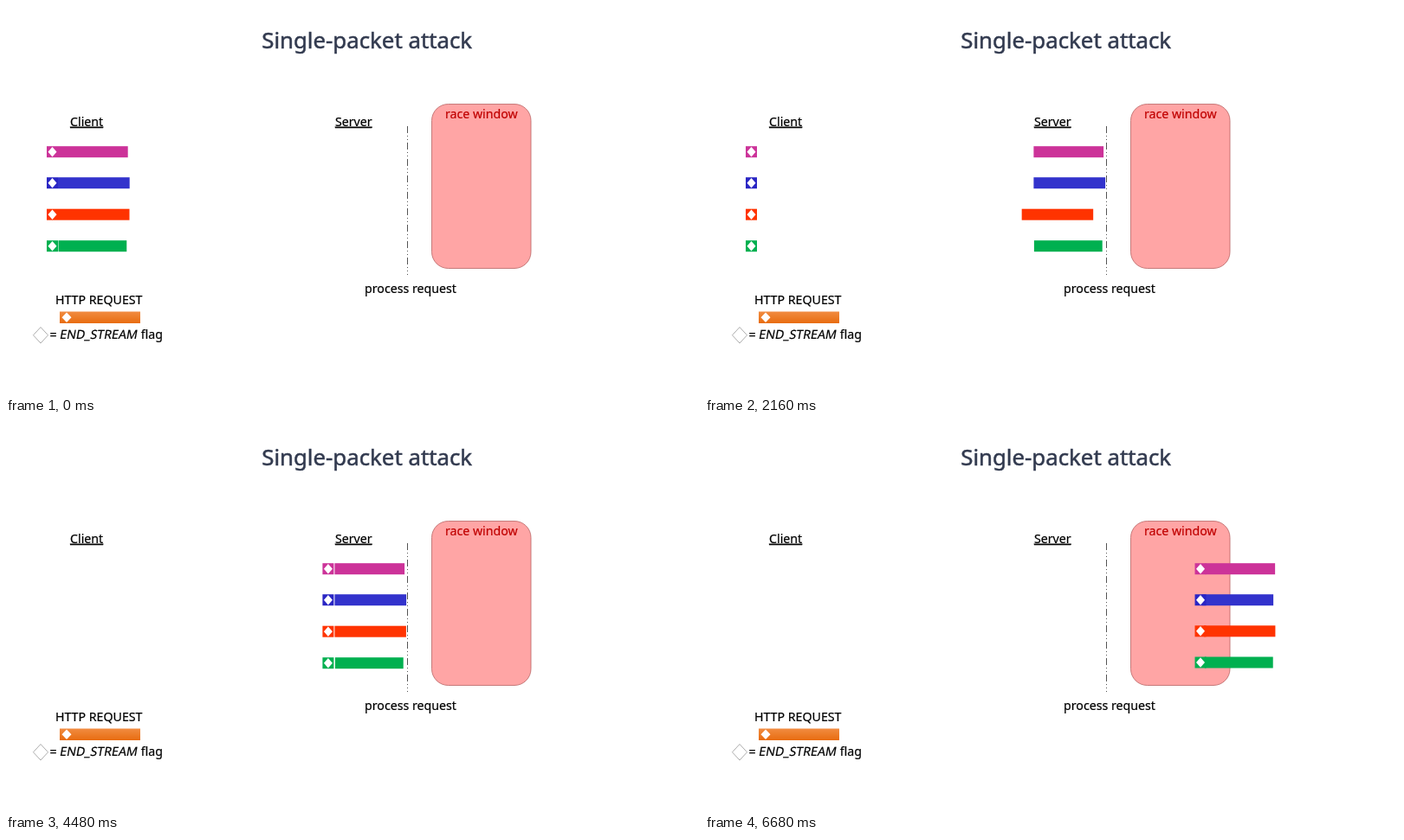
Write an HTML page that moves like this. It is 800 px wide and 450 px high and loops after 6.72 s.

```html
<!DOCTYPE html>
<html lang="en">
<head>
<meta charset="utf-8">
<title>Single-packet attack</title>
<style>
  html, body { margin: 0; width: 100%; height: 100%; overflow: hidden; background: #fff; }
  svg { display: block; width: 800px; height: 450px; }
  text { font: 14.2px "Noto Sans", "Open Sans", sans-serif; fill: #000; stroke: #000; stroke-width: .2px; }
  .mid { text-anchor: middle; }
  .title { font-size: 25.8px; fill: #323a4f; stroke: #323a4f; stroke-width: .5px; }
  .head { text-decoration: underline; text-decoration-thickness: 1px; }
  .race { fill: #c00000; stroke: #c00000; }
</style>
</head>
<body>
<svg viewBox="0 0 800 450">
  <defs>
    <linearGradient id="orange" x2="0" y2="1">
      <stop offset="0" stop-color="#f18c41"/>
      <stop offset="1" stop-color="#e86c10"/>
    </linearGradient>
  </defs>
  <text class="mid title" x="416.7" y="49">Single-packet attack</text>
  <text class="mid head" x="93.1" y="138.7">Client</text>
  <text class="mid head" x="401.3" y="138.7">Server</text>

  <path d="M463.5 139V311" stroke="#555" stroke-dasharray="8 3 1 3 1 3"/>
  <text class="mid" x="467" y="332.3">process request</text>
  <rect x="491.5" y="113.5" width="114.5" height="190" rx="19" fill="#ffa5a5" stroke="#b86464" stroke-width=".8"/>
  <text class="mid race" x="548.8" y="130">race window</text>

  <text class="mid" x="107.2" y="344.5">HTTP REQUEST</text>
  <rect x="62" y="353.5" width="93" height="13.5" fill="url(#orange)"/>
  <path d="M70 354.5l5.5 5.8-5.5 5.8-5.5-5.8z" fill="#fff"/>
  <path d="M40 371.5l8.5 9.3-8.5 9.3-8.5-9.3z" fill="#fff" stroke="#999" stroke-width=".8"/>
  <text x="50.5" y="385">=</text>
  <text transform="translate(61.5 385) skewX(-10)">END_STREAM</text>
  <text x="181" y="385" text-anchor="end">flag</text>
  <g id="requests"></g>
</svg>
<script>
const LOOP = 6720, STEP = 40, HEIGHT = 13;
const TRAVEL = 319.4;                             // bars, client to server
const FLAG = { start: 2849, span: 1667, travel: 318.7 };
const EXIT = { start: 4874, span: 1667, travel: 199.8 };

// x, y: bar corner; w: bar width; exit, rise: bar shift while being processed
const rows = [
  { color: '#cc3399', x: 60, y: 162.2, w: 80.7, start: 140, span: 1667, exit: 198, rise: 0 },
  { color: '#3333cc', flag: '#2a26c4', x: 60, y: 198.2, w: 82.7, start: 60, span: 1333, exit: 194, rise: 0 },
  { color: '#ff3300', x: 60, y: 234.7, w: 82.5, start: 163, span: 2340, exit: 196.5, rise: -.4 },
  { color: '#00b050', x: 60.5, y: 271.2, w: 78.8, start: 95, span: 2000, exit: 197, rise: -.7 }
];

const layer = document.getElementById('requests');
function add(parent, tag, attrs) {
  const el = document.createElementNS('http://www.w3.org/2000/svg', tag);
  for (const key in attrs) el.setAttribute(key, attrs[key]);
  return parent.appendChild(el);
}

for (const row of rows) {
  row.bar = add(layer, 'rect', { x: row.x, y: row.y, width: row.w, height: HEIGHT, fill: row.color });
  row.token = add(layer, 'g', {});
  add(row.token, 'rect', { x: 47, y: row.y, width: 13, height: HEIGHT, fill: row.flag || row.color });
  add(row.token, 'path', { d: `M53.5 ${row.y + .7}l5 5.8-5 5.8-5-5.8z`, fill: '#fff' });
}

// constant acceleration, then constant braking
function ease(t, { start, span }) {
  const u = Math.min(1, Math.max(0, (t - start) / span));
  return u < .5 ? 2 * u * u : 1 - 2 * (1 - u) ** 2;
}

function move(el, x, y) {
  el.setAttribute('transform', `translate(${x} ${y})`);
}

function draw(now) {
  const t = Math.floor(now % LOOP / STEP) * STEP;
  const flag = ease(t, FLAG), exit = ease(t, EXIT);
  for (const row of rows) {
    const y = row.rise * exit;
    move(row.bar, TRAVEL * ease(t, row) + row.exit * exit, y);
    move(row.token, FLAG.travel * flag + EXIT.travel * exit, y);
  }
}

let origin;
function tick(now) {
  origin ??= now;
  draw(now - origin);
  requestAnimationFrame(tick);
}
draw(0);
requestAnimationFrame(tick);
</script>
</body>
</html>
```
